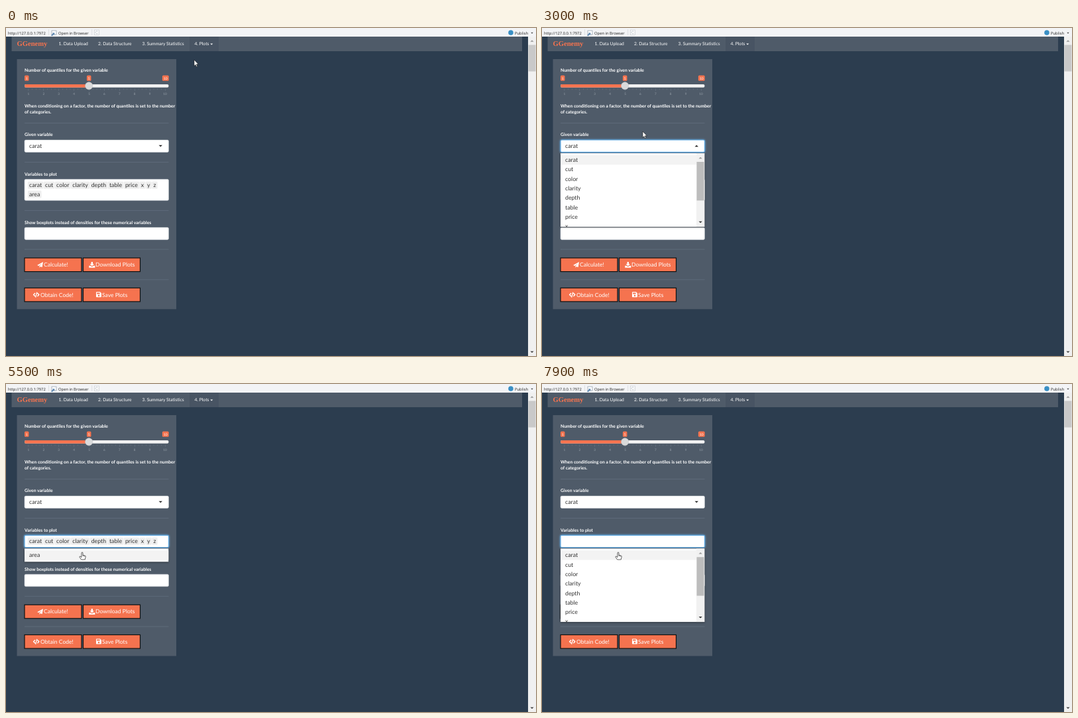
An HTML page that plays this animation: 800 by 495 pixels, repeating every 8 s.

```html
<!DOCTYPE html>
<html lang="en">
<head>
<meta charset="utf-8">
<title>GGenemy plots</title>
<style>
  html, body { margin: 0; width: 100%; height: 100%; overflow: hidden; background: #2c3d4f; }
  svg { display: block; }
  text { font-family: Lato, sans-serif; text-rendering: geometricPrecision; white-space: pre; }
  .nav, .label { font-size: 6.75px; fill: #fff; }
  .label { font-weight: 700; }
  .bar { font: 5.85px "Open Sans", sans-serif; fill: #222; }
  .brand { font: 700 10.6px "Liberation Serif", serif; fill: #f5734f; }
  .tick { font-size: 4.7px; fill: #98a1aa; text-anchor: middle; }
  .badge { font-size: 5px; fill: #fff; text-anchor: middle; }
  .value { font-size: 8.75px; fill: #333; }
  .button { font-size: 8.55px; fill: #fff; }
  .field { fill: #fff; stroke: #d5d9dd; stroke-width: .5; }
  .focus { stroke: #62a9df; stroke-width: 1.2; filter: drop-shadow(0 0 1.5px #66afe9); }
  .list { filter: drop-shadow(0 1.5px 1.5px rgba(0, 0, 0, .4)); }
</style>
</head>
<body>
<svg id="stage" width="800" height="495" viewBox="0 0 800 495"></svg>
<script>
const LOOP = 8000, STEP = 100;
const VARS = ["carat", "cut", "color", "clarity", "depth", "table", "price", "x", "y", "z", "area"];
const ORANGE = "#f5734f", PANEL = "#4f5b69";
const ROW = 14.33, LIST_MAX = 111, ROW_SHIFT = 13.8;

// Pointer stops: time, x, y
const PATH = [
  [0, 284, 48], [300, 284, 48], [1300, 147, 182], [2400, 147, 182],
  [2900, 152, 156], [3200, 152, 156], [3500, 134, 202], [4100, 120, 246],
  [4700, 117, 259.5], [5300, 117, 259.5], [5500, 115, 254], [LOOP, 115, 254]
];
const OPEN = 1600, CLOSE = 3300, FOCUS = 4400, ERASE = 5400, ERASE_GAP = 235;

const rect = (x, y, w, h, fill, more = "") =>
  `<rect x="${x}" y="${y}" width="${w}" height="${h}" fill="${fill}" ${more}/>`;
const text = (cls, x, y, s) => `<text class="${cls}" x="${x}" y="${y}">${s}</text>`;
const path = (d, fill, more = "") => `<path d="${d}" fill="${fill}" ${more}/>`;
const rule = y => rect(28, y, 217.5, .7, "#637080");
const field = (id, y, h) =>
  `<rect id="${id}" class="field" x="28" y="${y}" width="217.5" height="${h}" rx="1.8"/>`;
const caret = (x, y, r, fill, up) => {
  const k = up ? -1 : 1;
  return path(`M${x - r} ${y - k * r / 2}h${2 * r}l${-r} ${k * r}z`, fill);
};

const ICONS = {
  plane: "M0 5 9 0 7.6 8 4.9 6.9 3.5 8.8V6.3L7.3 2.3 2.6 5.9z",
  download: "M3.3 0h2.4v3h2L4.5 6.2 1.3 3h2zM0 5.8h2.5l2 1.8 2-1.8H9v2.9H0z",
  code: "M2.8 1.3 3.8 2.3 1.9 4.3 3.8 6.3 2.8 7.3 0 4.3zM7.2 1.3 6.2 2.3 8.1 4.3 6.2 6.3 7.2 7.3 10 4.3zM5.5.3 6.7.6 4.5 8.4 3.3 8.1z",
  save: "M.8 0H6L8 2v5.2a.8.8 0 0 1-.8.8H.8A.8.8 0 0 1 0 7.2V.8A.8.8 0 0 1 .8 0zM1.1 1.1v2h4.5v-2zM4 4.3a1.3 1.3 0 1 0 .01 0z"
};
const button = (x, y, icon, ix, label, tx) =>
  rect(x, y, 86, 20.6, ORANGE, 'stroke="#111" stroke-width="1.2"') +
  path(ICONS[icon], "#fff", `fill-rule="evenodd" transform="translate(${ix} ${y + 6})"`) +
  text("button", tx, y + 13.3, label);

function browserBar() {
  return rect(0, 0, 800, 13, "#f3f4f6") +
    text("bar", 3, 9.7, "http://127.0.0.1:7972") +
    rect(64, 2, .6, 9, "#cfd2d6") +
    rect(69, 4, 7, 6, "#fff", 'stroke="#9aa5b1" stroke-width=".8"') +
    path("M68 11l3-3-1.3-.8h3.6v3.5l-1-1.2-2.8 2.7z", "#5d87b0") +
    text("bar", 79, 9.7, "Open in Browser") +
    rect(129.5, 2, .6, 9, "#cfd2d6") +
    rect(133.5, 3, 7, 7.5, "#fbfbfb", 'stroke="#c9ced3" stroke-width=".7"') +
    path("M138.7 5.5a2 2 0 1 0 .3 1.9", "none", 'stroke="#bcc4cc" stroke-width=".8"') +
    '<circle cx="762" cy="7" r="3.8" fill="#3a8fc4"/>' +
    text("bar", 768, 9.7, "Publish") + caret(794, 7.6, 1.7, "#333");
}

function navBar() {
  return rect(8.5, 13, 770.5, 22, PANEL) + rect(277, 13, 44, 22, "#485463") +
    text("brand", 16.5, 27.3, "GGenemy") +
    text("nav", 79.5, 26, "1. Data Upload") +
    text("nav", 139, 26, "2. Data Structure") +
    text("nav", 205.5, 26, "3. Summary Statistics") +
    text("nav", 284.5, 26, "4. Plots") + caret(310.3, 24.4, 2, "#fff");
}

function pageScroll() {
  return rect(788, 13, 12, 482, "#f0f0f0") + rect(788.5, 25.5, 11, 40, "#c9c9c9") +
    caret(794, 19.5, 2.6, "#999", true) + caret(794, 489, 2.6, "#444");
}

function slider() {
  const badge = (cx, w, s) => rect(cx - w / 2, 71.5, w, 8.3, ORANGE, 'rx="1.6"') + text("badge", cx, 77.5, s);
  let out = badge(31.2, 6.5, 1) + badge(125.2, 6.5, 5) + badge(240.8, 9.8, 10);
  for (let i = 0; i <= 36; i++) {
    out += rect(33.7 + i * 5.73, 91.5, .4, i % 4 ? 1.8 : 3.4, "#748090");
  }
  for (let i = 0; i < 10; i++) out += text("tick", 33.9 + i * 22.9, 101, i + 1);
  return out + rect(28, 85, 217.5, 4.8, "#f2f2f2", 'rx="2"') +
    rect(28, 85, 97, 4.8, ORANGE, 'rx="2"') +
    '<circle cx="125.2" cy="87.3" r="5.7" fill="#d9dadb" stroke="#b9bcc0" stroke-width=".4"/>';
}

function form() {
  return '<rect id="panel" x="16.5" y="47" width="240.5" fill="' + PANEL + '"/>' +
    text("label", 28, 66.3, "Number of quantiles for the given variable") + slider() +
    text("label", 28, 119.9, "When conditioning on a factor, the number of quantiles is set to the number") +
    text("label", 28, 129.1, "of categories.") + rule(143) +
    text("label", 28, 163.3, "Given variable") + field("given", 169, 18.4) +
    text("value", 35, 181.2, "carat") + '<g id="arrow"></g>' + rule(202) +
    text("label", 28, 222.5, "Variables to plot") + field("plotted", 228.3, 32) + '<g id="tokens"></g>' +
    '<g id="lower">' + rule(275) +
    text("label", 28, 295.8, "Show boxplots instead of densities for these numerical variables") +
    field("boxes", 301, 18.4) + rule(333.7) +
    button(28, 347, "plane", 47, "Calculate!", 57) +
    button(116.5, 347, "download", 125.3, "Download Plots", 135) + rule(379.5) +
    button(28, 392.3, "code", 40.7, "Obtain Code!", 52) +
    button(116.5, 392.3, "save", 136, "Save Plots", 145) + "</g>";
}

function optionList(y, names) {
  const n = names.length, full = n * ROW + 6, h = Math.min(full, LIST_MAX);
  const scrolls = full > LIST_MAX, w = scrolls ? 205 : 217.5;
  let out = `<svg x="28" y="${y}" width="217.5" height="${h}">` + rect(0, 0, 217.5, h, "#fff") +
    rect(0, 3, w, ROW, "#f3f3f3");
  names.forEach((s, i) => out += text("value", 7, 13 + i * ROW, s));
  if (scrolls) {
    const track = h - 25;
    out += rect(205, 0, 12.5, h, "#f1f1f1") +
      rect(205.5, 13, 11, track * h / full, "#bdbdbd") +
      caret(211.2, 7, 2.6, "#999", true) + caret(211.2, h - 7, 2.6, "#333");
  }
  return `<g class="list">${out}</svg></g>`;
}

const POINTERS = {
  arrow: path("M0 0V9.3L2.1 7.4 3.5 10.5 4.9 9.9 3.5 6.8H6.4z", "#fff", 'stroke="#111" stroke-width=".6"'),
  beam: path("M-2-4H-.5L0-3.6.5-4H2M0-3.6V3.6M-2 4H-.5L0 3.6.5 4H2", "none", 'stroke="#111" stroke-width="1"'),
  hand: path("M-1 .6Q0-.8 1 .6V4.3L4.6 5.2Q5.4 5.6 5.2 6.8L4.2 11H-1.3L-4 7.3Q-4.3 6-3 6L-1 7.6z",
    "#fff", 'stroke="#222" stroke-width=".7" stroke-linejoin="round"') +
    path("M1 4V6M2.4 4.6V6.3M3.8 5V6.6", "none", 'stroke="#222" stroke-width=".5"')
};

const stage = document.getElementById("stage");
stage.innerHTML = rect(0, 0, 800, 495, "#2c3d4f") + navBar() + browserBar() + pageScroll() +
  form() + '<g id="lists"></g><g id="pointer"></g>';
const el = id => document.getElementById(id);

// Lay the chosen variables out in wrapping rows.
const tokens = el("tokens");
function layTokens() {
  tokens.innerHTML = VARS.map(s => `<g>${rect(-2.2, -8.6, 0, 11, "#eeeeee", 'rx="1.4"')}${text("value", 0, 0, s)}</g>`).join("");
  let x = 35, y = 240.4;
  for (const g of tokens.children) {
    const w = g.lastChild.getComputedTextLength();
    if (x + w > 238) { x = 35; y += ROW_SHIFT; }
    g.firstChild.setAttribute("width", w + 4.4);
    g.setAttribute("transform", `translate(${x} ${y})`);
    x += w + 4.9;
  }
}
layTokens();

function pointerAt(t) {
  const i = PATH.findIndex(p => p[0] > t);
  const [t0, x0, y0] = PATH[i - 1], [t1, x1, y1] = PATH[i];
  const u = (t - t0) / (t1 - t0), e = u * u * (3 - 2 * u);
  return [x0 + (x1 - x0) * e, y0 + (y1 - y0) * e];
}

function pointerKind(x, y, open, gone) {
  const within = (a, b) => x > 28 && x < 246 && y > a && y < b;
  if (open && within(189, 300) || gone && within(248, 360)) return "hand";
  return within(169, 187.5) || within(228, 260.5) ? "beam" : "arrow";
}

let shown = "";
function draw(now) {
  const t = Math.floor(now % LOOP / STEP) * STEP;
  const open = t >= OPEN && t < CLOSE, focus = t >= FOCUS;
  const gone = t < ERASE ? 0 : Math.min(VARS.length, 1 + Math.floor((t - ERASE) / ERASE_GAP));
  const shift = gone ? ROW_SHIFT : 0;
  const key = [open, focus, gone].join();
  if (key !== shown) {
    shown = key;
    el("given").classList.toggle("focus", open);
    el("plotted").classList.toggle("focus", focus);
    el("plotted").setAttribute("height", 32 - shift);
    el("panel").setAttribute("height", 377.3 - shift);
    el("lower").setAttribute("transform", `translate(0 ${-shift})`);
    el("arrow").innerHTML = caret(233.3, 178, 2.7, "#222", open);
    [...tokens.children].forEach((g, i) => g.style.display = i < VARS.length - gone ? "" : "none");
    el("lists").innerHTML = open ? optionList(189, VARS)
      : gone ? optionList(248.2, VARS.slice(-gone)) : "";
  }
  const [x, y] = pointerAt(t);
  el("pointer").innerHTML = POINTERS[pointerKind(x, y, open, gone)];
  el("pointer").setAttribute("transform", `translate(${x} ${y})`);
}

const start = performance.now();
function tick() {
  draw(performance.now() - start);
  requestAnimationFrame(tick);
}
tick();
</script>
</body>
</html>
```
